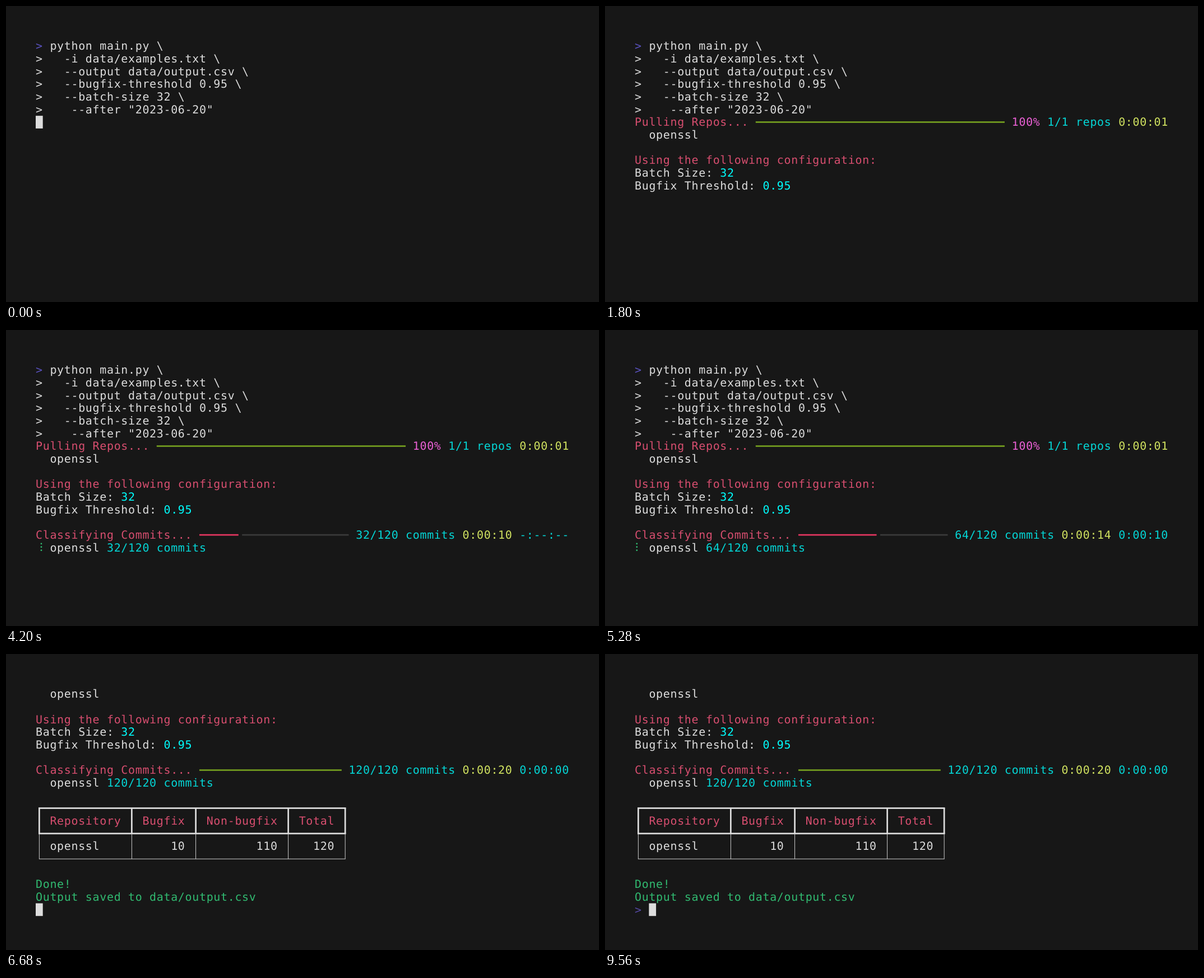
Animation, 1058 px wide and 529 px high, one loop 9720 ms. Source, as an HTML page:

```html
<!DOCTYPE html>
<html lang="en">
<head>
<meta charset="utf-8">
<title>Commit classifier in a terminal</title>
<style>
html, body { margin: 0; width: 100%; height: 100%; overflow: hidden; background: #171717; }
svg { display: block; width: 1058px; height: 529px; }
text {
  font: 22px "DejaVu Sans Mono", monospace;
  letter-spacing: .755px;
  white-space: pre;
  text-rendering: geometricPrecision;
}
</style>
</head>
<body>
<svg viewBox="0 0 1058 529"><g id="screen" transform="translate(53 60.2) scale(.90667)"></g></svg>
<script>
const LOOP = 9720, TICK = 40, CELL_W = 14, CELL_H = 25;
const COLOR = {
  fg: '#dddddd', red: '#d74e6f', green: '#31bb71', yellow: '#d3e561', cyan: '#04d7d7',
  bright: '#00fefe', magenta: '#ed61d7', prompt: '#5a52c0', lastPrompt: '#5549a4',
  done: '#729c1f', active: '#e0355f', rest: '#3a3a3a'
};
const screen = document.getElementById('screen');

// Drawing helpers: positions are terminal columns and rows.
const text = (col, row, str, color = 'fg', bold = false) =>
  `<text x="${col * CELL_W}" y="${row * CELL_H + 20}" fill="${COLOR[color]}"` +
  `${bold ? ' font-weight="bold"' : ''}>${str.replace(/>/g, '&gt;')}</text>`;

const rect = (x, y, w, h, color = 'fg') =>
  `<rect x="${x}" y="${y}" width="${w}" height="${h}" fill="${COLOR[color]}"/>`;

const cursor = (col, row) => rect(col * CELL_W, row * CELL_H, CELL_W, CELL_H);

const rule = (from, to, row, color) =>
  to > from ? rect(from * CELL_W, row * CELL_H + 11, (to - from) * CELL_W, 3, color) : '';

function bar(col, row, width, share) {
  if (share >= 1) return rule(col, col + width, row, 'done');
  const filled = Math.floor(width * 2 * share) / 2;
  const gap = filled ? .5 : 0;
  return rule(col, col + filled, row, 'active') +
    rule(col + filled + gap, col + width, row, 'rest');
}

// Braille spinner: each character lists its dots, 1-3 on the left and 4-6 on the right.
const SPINNER = ['124', '145', '1456', '456', '3456', '356', '236', '1236', '123', '1234'];

const spinner = (row, seconds) =>
  [...SPINNER[Math.floor(seconds / .08) % 10]].map(dot => {
    const x = dot > 3 ? 11 : 4.2, y = row * CELL_H + 4.8 + (dot - 1) % 3 * 6.5;
    return `<circle cx="${x}" cy="${y}" r="1.55" fill="${COLOR.green}"/>`;
  }).join('');

const clock = seconds => '0:00:' + String(Math.floor(seconds)).padStart(2, '0');

function command() {
  const lines = ['-i data/examples.txt \\', '--output data/output.csv \\',
    '--bugfix-threshold 0.95 \\', '--batch-size 32 \\', ' --after "2023-06-20"'];
  return text(0, 0, '>', 'prompt') + text(2, 0, 'python main.py \\') +
    lines.map((line, i) => {
      const indent = line.length - line.trimStart().length;
      return text(0, i + 1, '>') + text(4 + indent, i + 1, line.trim());
    }).join('');
}

function pulling(seconds, finished) {
  return text(0, 6, 'Pulling Repos...', 'red') + bar(17, 6, 35, finished ? 1 : 0) +
    (finished ? text(53, 6, '100%', 'magenta') : text(55, 6, '0%', 'magenta')) +
    text(58, 6, `${+finished}/1 repos`, 'cyan') + text(68, 6, clock(seconds), 'yellow') +
    (finished ? '' : spinner(7, seconds)) + text(2, 7, 'openssl');
}

const config = row =>
  text(0, row, 'Using the following configuration:', 'red') +
  text(0, row + 1, 'Batch Size:') + text(12, row + 1, '32', 'bright', true) +
  text(0, row + 2, 'Bugfix Threshold:') + text(18, row + 2, '0.95', 'bright', true);

function classifying(row, count, seconds, eta) {
  const label = `${count}/120 commits`, start = 59 - label.length;
  return text(0, row, 'Classifying Commits...', 'red') +
    bar(23, row, start - 24, count / 120) + text(start, row, label, 'cyan') +
    text(60, row, clock(seconds), 'yellow') + text(68, row, eta, 'cyan') +
    (count < 120 ? spinner(row + 1, seconds) : '') +
    text(2, row + 1, 'openssl') + text(10, row + 1, label, 'cyan');
}

function table() {
  const x = col => col * CELL_W + 7, y = row => row * CELL_H + 12.5;
  const edges = [0, 13, 22, 35, 43];
  const across = (row, w) => rect(x(0) - w / 2, y(row) - w / 2, x(43) - x(0) + w, w);
  const down = (col, row, w) => rect(x(col) - w / 2, y(row), w, 2 * CELL_H);
  return across(9, 3) + across(11, 3) + across(13, 1) +
    edges.map(col => down(col, 9, 3) + down(col, 11, 1)).join('') +
    text(2, 10, 'Repository', 'red') + text(15, 10, 'Bugfix', 'red') +
    text(24, 10, 'Non-bugfix', 'red') + text(37, 10, 'Total', 'red') +
    text(2, 12, 'openssl') + text(19, 12, '10') + text(31, 12, '110') + text(39, 12, '120');
}

const results = () =>
  text(2, 0, 'openssl') + config(2) + classifying(6, 120, 20, clock(0)) + table() +
  text(0, 15, 'Done!', 'green') + text(0, 16, 'Output saved to data/output.csv', 'green');

// Timeline: [ms, seconds on the classifying clock]
const PACE = [[1840, 0], [3120, 5.56], [4200, 10.68], [6240, 17.48], [6600, 20.1]];
const STAGES = [[6600, 120, '0:00:00'], [5800, 96, '0:00:04'], [4280, 64, '0:00:10'],
  [3080, 32, '-:--:--'], [0, 0, '-:--:--']];

function elapsed(t) {
  const i = Math.max(1, PACE.findIndex(([ms]) => ms >= t));
  if (t >= 6600) return 20.1;
  const [[t0, s0], [t1, s1]] = [PACE[i - 1], PACE[i]];
  return s0 + (s1 - s0) * (t - t0) / (t1 - t0);
}

// The terminal redraws its progress at alternating 80 and 40 ms.
function refresh(t) {
  if (t >= 5760) return t;
  const phase = t % 120;
  return Math.max(1840, t - phase + (phase >= 80 ? 80 : 0));
}

function draw(t) {
  if (t >= 6640) {
    if (t < 6840) return results() + (t >= 6680 ? cursor(0, 17) : '');
    const blink = Math.floor((t + TICK - 1 - 6840) / 194.3);
    return results() + text(0, 17, '>', 'lastPrompt') + (blink % 2 ? '' : cursor(2, 17));
  }
  if (t < 760) return command() + (t < 200 || t >= 400 && t < 600 ? cursor(0, 6) : '');
  if (t < 1080) return command() + pulling((t - 760) / 240, false);

  const pulled = command() + pulling(1, true);
  if (t < 1800) {
    const visible = t >= 1120 && t < 1320 || t >= 1520 && t < 1720;
    return pulled + (visible ? cursor(0, 8) : '');
  }
  if (t < 1840) return pulled + config(9);
  const now = refresh(t);
  const [, count, eta] = STAGES.find(([ms]) => t >= ms);
  return pulled + config(9) + classifying(13, count, elapsed(now), eta);
}

let shown = -1;
function frame() {
  const t = Math.floor(performance.now() % LOOP / TICK) * TICK;
  if (t !== shown) {
    shown = t;
    screen.innerHTML = draw(t);
  }
  requestAnimationFrame(frame);
}
frame();
</script>
</body>
</html>
```
